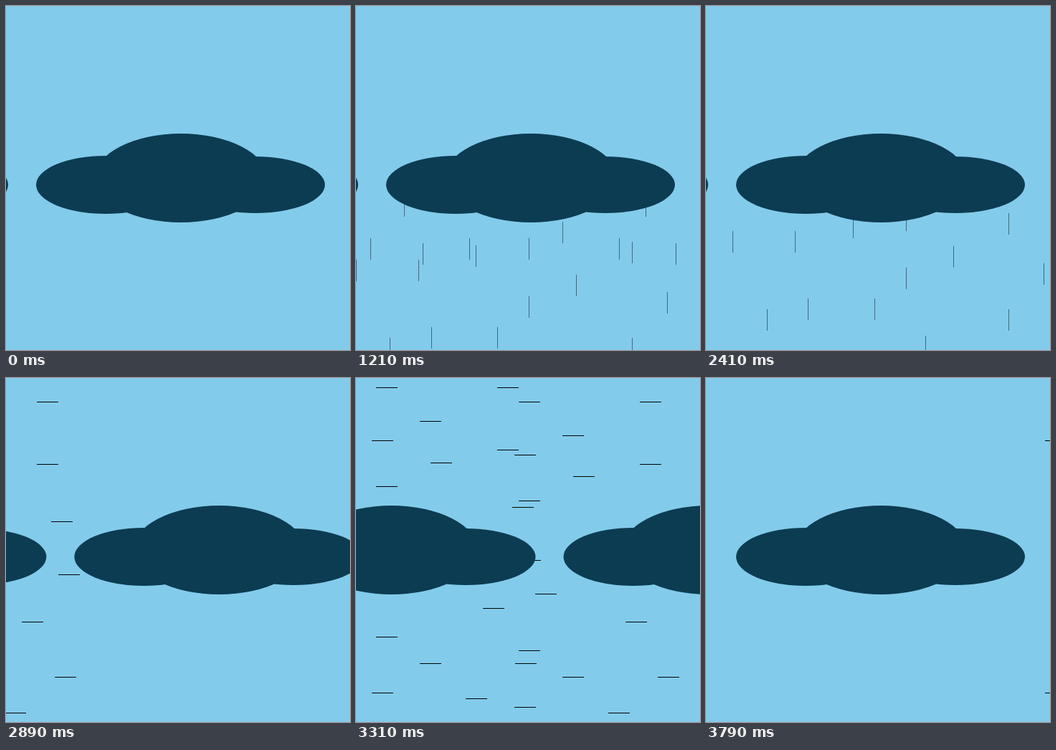
An HTML page with a canvas that plays this animation: 480 px wide and 480 px high, repeating every 3850 ms.

```html
<!DOCTYPE html>
<html lang="en">
<head>
<meta charset="utf-8">
<title>Rain cloud</title>
<style>
  html, body { margin: 0; width: 100%; height: 100%; overflow: hidden; background: #83cbeb; }
  canvas { display: block; width: 480px; height: 480px; }
</style>
</head>
<body>
<canvas id="stage" width="480" height="480"></canvas>
<script>
const ctx = document.getElementById('stage').getContext('2d');
const SIZE = 480, LOOP = 3850, STEP = 60;
const RAIN_START = 670, WIND_START = 2770;
const SKY = '#83cbeb', CLOUD = '#0c3c52', RAIN = '#3c6982', WIND = '#000';
const DASH = 30, RAIN_TOP = 277;

// One shower; a second copy trails behind it.
const DROPS = [
  [0, 354.4], [87, 354.4], [167.2, 334], [241.2, 324], [307.4, 375], [384.6, 329.4],
  [241.2, 405], [434, 399], [104.6, 448], [197.2, 448], [47.2, 463], [384.6, 463],
  [0, 523.4], [73.7, 530], [138, 523.4], [268.2, 500.4], [347.4, 523.4], [426, 530]
];
const TRAIL = { x: 19.7, y: -199 };

// cx, cy, rx, ry
const PUFFS = [[139, 249.5, 97, 40.5], [244, 240, 120, 62], [348, 249.5, 97, 39.5]];

const CLOUD_PATH = [[WIND_START, 0], [3130, 160], [3490, 335], [3730, 442]];
const WIND_PATH = [[WIND_START, -303], [3130, 0], [3490, 303], [3790, 603]];

function along(path, t) {
  if (t <= path[0][0]) return path[0][1];
  for (let i = 1; i < path.length; i++) {
    const [t0, v0] = path[i - 1], [t1, v1] = path[i];
    if (t <= t1) return v0 + (v1 - v0) * (t - t0) / (t1 - t0);
  }
  return path[path.length - 1][1];
}

function eachDrop(dx, dy, paint) {
  for (const k of [0, 1])
    for (const [x, y] of DROPS) paint(x + dx + k * TRAIL.x, y + dy + k * TRAIL.y);
}

function drawRain(t) {
  ctx.save();
  ctx.beginPath();
  ctx.rect(0, RAIN_TOP, SIZE, SIZE - RAIN_TOP);
  ctx.clip();
  ctx.fillStyle = RAIN;
  const drop = (x, y) => ctx.fillRect(Math.round(x), Math.round(y), 1, DASH);
  eachDrop(0, (t - 1210) * 283 / 540, drop);
  eachDrop(17.7, -167 + (t - 1750) * 326 / 660, drop);
  ctx.restore();
}

// The shower turned a quarter, blown to the right.
function drawWind(t) {
  const shift = along(WIND_PATH, t);
  ctx.fillStyle = WIND;
  for (const k of [0, 1])
    for (const [x, y] of DROPS)
      ctx.fillRect(Math.round(599 - y + k * TRAIL.y + shift), Math.round(x + 32.8 - k * TRAIL.x), DASH, 1);
}

function drawCloud(dx) {
  ctx.fillStyle = CLOUD;
  for (const [cx, cy, rx, ry] of PUFFS) {
    ctx.beginPath();
    ctx.ellipse(cx + dx, cy, rx, ry, 0, 0, 2 * Math.PI);
    ctx.fill();
  }
}

function draw(time) {
  let t = time % LOOP;
  if (t >= RAIN_START) t = RAIN_START + Math.floor((t - RAIN_START) / STEP) * STEP;
  ctx.fillStyle = SKY;
  ctx.fillRect(0, 0, SIZE, SIZE);
  if (t >= RAIN_START && t <= WIND_START) drawRain(t);
  if (t > WIND_START) drawWind(t);
  const dx = along(CLOUD_PATH, t);
  drawCloud(dx);
  drawCloud(dx - 442);
}

const start = performance.now();
function tick() {
  draw(performance.now() - start);
  requestAnimationFrame(tick);
}
tick();
</script>
</body>
</html>
```
